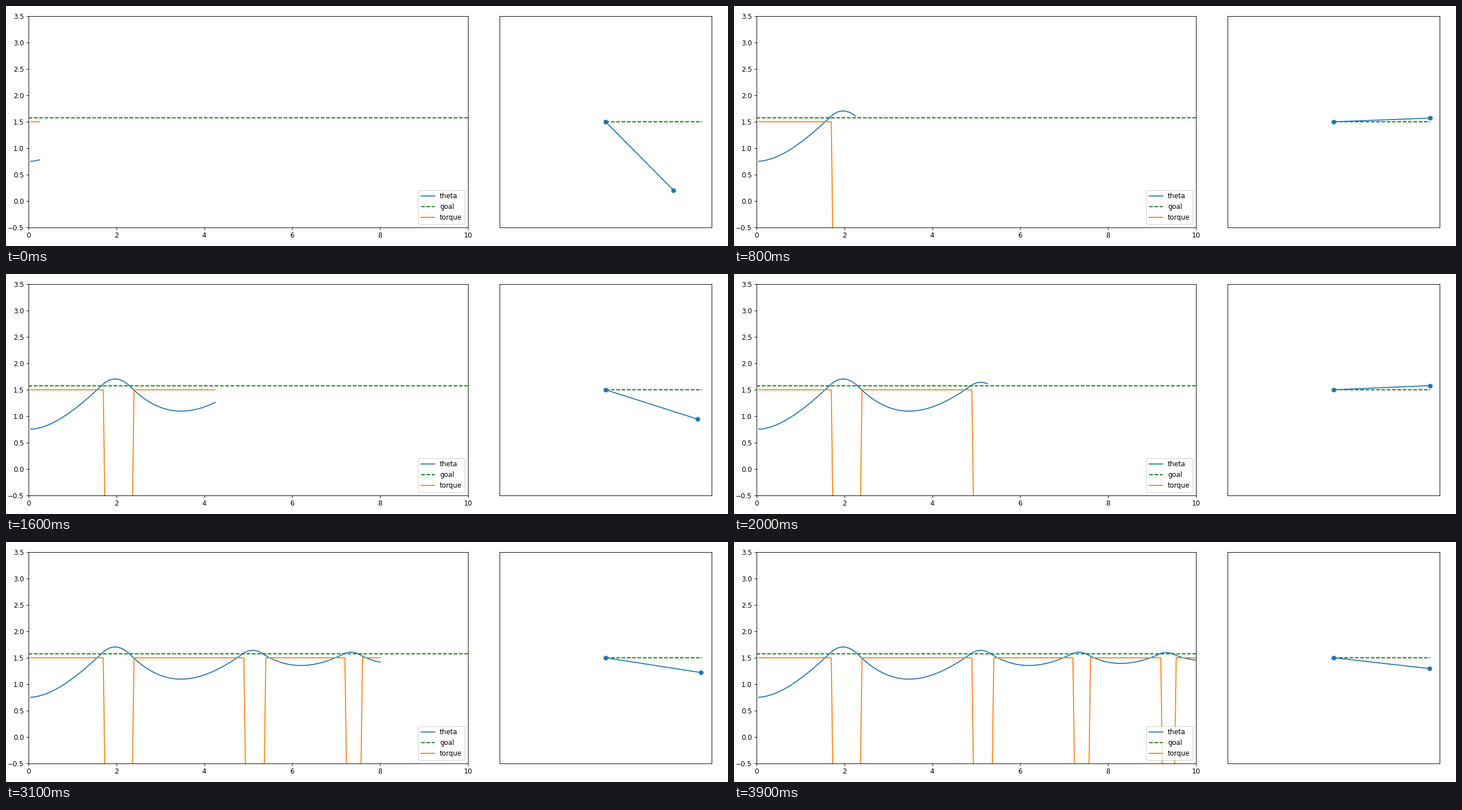
A matplotlib script that plays this animation: 1280x427 px, repeating every 4000 ms.

```python
import math

import numpy as np
import matplotlib.pyplot as plt
from matplotlib.animation import FuncAnimation

W, H = 1280, 427
DPI = W / 15
FRAMES, INTERVAL = 40, 100
STEPS_PER_FRAME = 5
DT = 0.05
GOAL = math.pi / 2
DAMPING = 0.4
TORQUE = 1.5
# Step ranges (inclusive) during which the motor pushes backwards
REVERSED = [(35, 47), (99, 107), (145, 151), (185, 190)]


def simulate(steps):
    """Damped pendulum driven by a bang-bang torque."""
    theta, omega = 0.75, 0.0
    angles, torques = [], []
    for n in range(1, steps + 1):
        back = any(a <= n <= b for a, b in REVERSED)
        u = -TORQUE if back else TORQUE
        omega += (u - math.sin(theta) - DAMPING * omega) * DT
        theta += omega * DT
        angles.append(theta)
        torques.append(u)
    return np.array(angles), np.array(torques)


def add_axes(left, right, top, bottom):
    """Axes placed by pixel edges, y counted from the top."""
    return fig.add_axes([left / W, 1 - bottom / H,
                         (right - left) / W, (bottom - top) / H])


angles, torques = simulate(FRAMES * STEPS_PER_FRAME)
times = DT * np.arange(1, len(angles) + 1)

# The tiny margin keeps the pixel size from being rounded down
fig = plt.figure(figsize=((W + 1e-6) / DPI, (H + 1e-6) / DPI), dpi=DPI)

chart = add_axes(40, 819, 18, 394)
chart.set_xlim(0, 10)
chart.set_ylim(-0.5, 3.5)
theta_line, = chart.plot([], [], color="tab:blue", label="theta")
chart.plot([0, 10], [GOAL, GOAL], "--", color="green", label="goal")
torque_line, = chart.plot([], [], color="tab:orange", label="torque")
chart.legend(loc="lower right")

view = add_axes(875, 1251, 18, 394)
view.set_xlim(-1.1, 1.1)
view.set_ylim(-1.1, 1.1)
view.set_xticks([])
view.set_yticks([])
view.plot([0, math.sin(GOAL)], [0, -math.cos(GOAL)], "--", color="green")
arm, = view.plot([], [], "o-", color="tab:blue")


def update(frame):
    n = (frame + 1) * STEPS_PER_FRAME
    theta_line.set_data(times[:n], angles[:n])
    torque_line.set_data(times[:n], torques[:n])
    theta = angles[n - 1]
    arm.set_data([0, math.sin(theta)], [0, -math.cos(theta)])
    return theta_line, torque_line, arm


anim = FuncAnimation(fig, update, frames=FRAMES, interval=INTERVAL,
                     init_func=lambda: update(0), repeat=True, blit=False)
plt.show()
```
